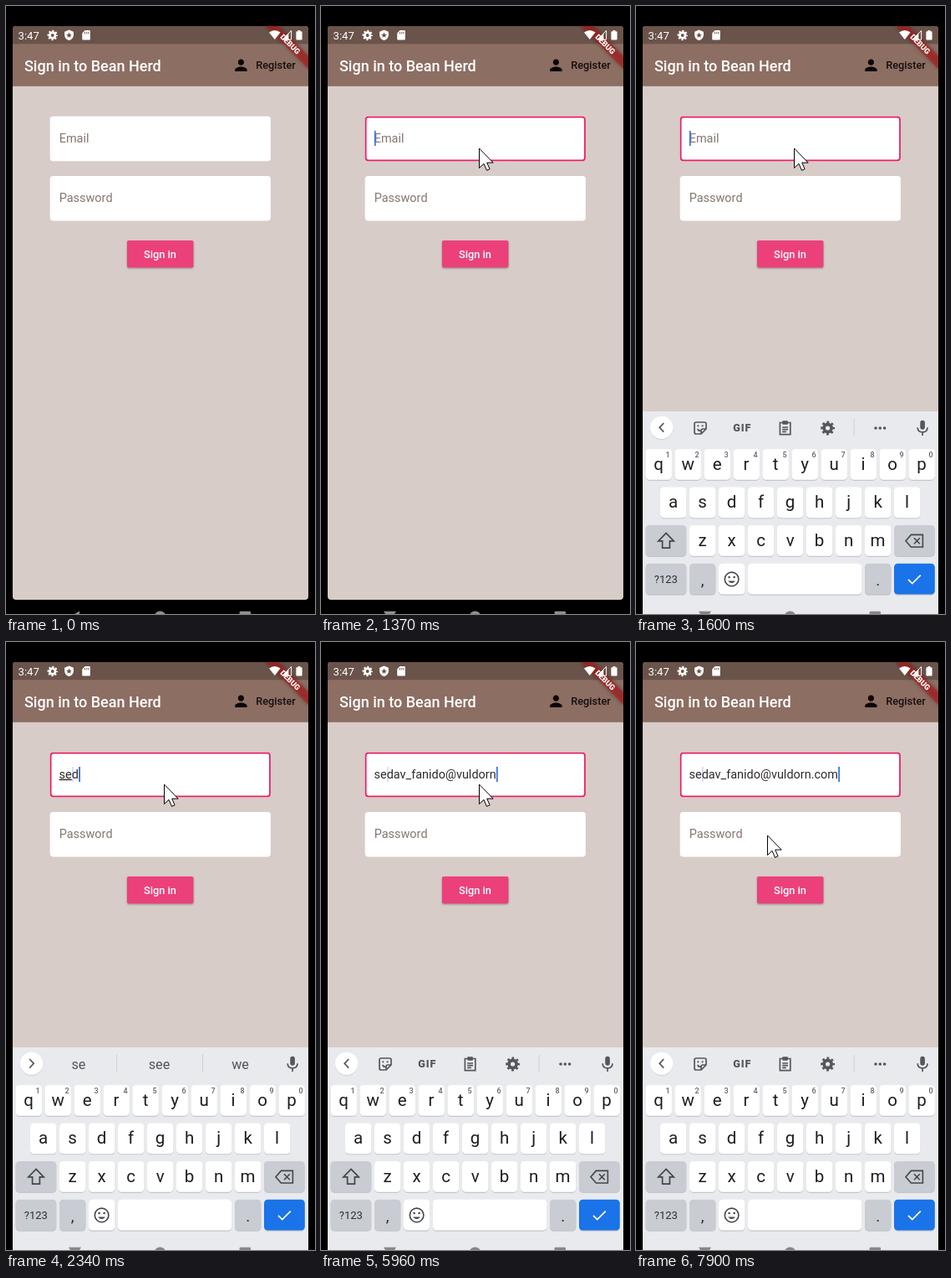
An HTML page for the animation above (8000 ms loop, 370 by 726 pixels).

```html
<!DOCTYPE html>
<html lang="en">
<head>
<meta charset="utf-8">
<title>Sign-in screen</title>
<style>
  html, body { margin: 0; width: 100%; height: 100%; overflow: hidden; background: #000; }
  svg { display: block; width: 370px; height: 726px; font-family: Roboto, "Noto Sans", sans-serif; }
  .mid { text-anchor: middle; }
  .med { font-weight: 500; }
  .line { fill: none; stroke: #54575b; stroke-width: 1.7; }
  .field { font-size: 14.46px; }
  .label { fill: #87756f; }
  .u { text-decoration: underline; }
</style>
</head>
<body>
<svg id="stage" viewBox="0 0 370 726" xmlns="http://www.w3.org/2000/svg"></svg>
<script>
const LOOP = 8000;
const stage = document.getElementById('stage');

// Markup helpers
const rect = (x, y, w, h, fill, r = 0, more = '') =>
  `<rect x="${x}" y="${y}" width="${w}" height="${h}" rx="${r}" fill="${fill}" ${more}/>`;
const circle = (x, y, r, more) => `<circle cx="${x}" cy="${y}" r="${r}" ${more}/>`;
const path = (d, more = '') => `<path d="${d}" ${more}/>`;
const text = (x, y, size, fill, str, cls = '', more = '') =>
  `<text x="${x}" y="${y}" font-size="${size}" fill="${fill}" class="${cls}" ${more}>${str}</text>`;

function gear(x, y, r, color) {
  const ring = r * 0.55, teeth = r * 0.86, gap = teeth * Math.PI / 8;
  return circle(x, y, ring, `fill="none" stroke="${color}" stroke-width="${r * 0.46}"`) +
    circle(x, y, teeth, `fill="none" stroke="${color}" stroke-width="${r * 0.34}"
      stroke-dasharray="${gap}" stroke-dashoffset="${gap / 2}"`);
}

function statusBar() {
  return text(14.6, 39.6, 13.1, '#fff', '3:47') +
    gear(55.7, 35, 6, '#fff') +
    path('M75.5 28.6l5.4 2.2v3.6c0 3.2-2.3 5.6-5.4 6.7c-3.1-1.1-5.4-3.5-5.4-6.7v-3.6z', 'fill="#fff"') +
    path('M75.5 31.5l1 2.2 2.3.2-1.8 1.5.6 2.3-2.1-1.3-2.1 1.3.6-2.3-1.8-1.5 2.3-.2z', 'fill="#6a534a"') +
    path('M94.6 29h5.2q1 0 1 1v9.5q0 1-1 1h-7.6q-1 0-1-1v-7z', 'fill="#fff"') +
    path('M94.5 31v2.4M96.7 31v2.4M98.8 31v2.4', 'stroke="#6a534a" stroke-width=".9"') +
    path('M315 31.4q6.8-5 13.6 0l-6.8 8.6z', 'fill="#fff"') +
    path('M341.6 29.4v10.8h-10.6z', 'fill="none" stroke="#fff" stroke-width="1"') +
    path('M338.4 32.6v7.6h-7.4z', 'fill="#fff"') +
    path('M349.6 29h2.8v1.3h1.3q.9 0 .9.9v8.3q0 .9-.9.9h-5.4q-.9 0-.9-.9v-8.3q0-.9.9-.9h1.3z', 'fill="#fff"');
}

function banner() {
  return `<g clip-path="url(#screen)"><g transform="translate(362 24) rotate(45) scale(.9)">
    ${rect(-40, 28, 80, 12, '#b71c1c', 0, 'fill-opacity=".63" style="filter:drop-shadow(0 0 3px rgba(0,0,0,.5))"')}
    ${text(0, 37.6, 10.2, '#fff', 'DEBUG', 'mid', 'font-weight="900"')}</g></g>`;
}

function page() {
  return rect(8, 24, 354, 685, '#d7ccc8', 4) +
    path('M8 46v-18q0-4 4-4h346q4 0 4 4v18z', 'fill="#6a534a"') +
    rect(8, 45.3, 354, 50.5, '#8d6e63') +
    text(22, 77.6, 18, '#fff', 'Sign in to Bean Herd', 'med') +
    path('M12 12c2.21 0 4-1.79 4-4s-1.79-4-4-4-4 1.79-4 4 1.79 4 4 4zm0 2c-2.67 0-8 1.34-8 4v2h16v-2c0-2.66-5.33-4-8-4z',
      'fill="#0b0706" transform="translate(270.6 60) scale(.9)"') +
    text(299.3, 75.3, 12.75, '#150f0d', 'Register', 'med') +
    rect(52.7, 131.8, 264.2, 53.4, '#fff', 3.6) +
    rect(53.6, 132.7, 262.4, 51.6, 'none', 3, 'id="focus" stroke="#e91e63" stroke-width="1.8"') +
    rect(52.7, 203, 264.2, 53.4, '#fff', 3.6) +
    text(63.7, 233.9, 14.46, '', 'Password', 'label') +
    rect(79, 149, 1.8, 18, '#d5dff8', 0, 'id="trace"') +
    text(63.7, 162.7, 14.46, '', 'Email', 'label', 'id="hint"') +
    `<text id="entry" class="field" x="63.6" y="162.7" fill="#2f2a29"><tspan id="composing" class="u"></tspan><tspan id="settled"></tspan></text>` +
    rect(0, 149, 1.9, 18, '#4479e0', 0, 'id="caret"') +
    rect(145, 280, 79.4, 32.2, '#ec407a', 1.8, 'style="filter:drop-shadow(0 1.3px 1.2px rgba(0,0,0,.35))"') +
    text(184.5, 300.7, 12.75, '#fff', 'Sign in', 'mid med');
}

function key(x, y, w, fill = '#fff') {
  return rect(x, y + 1.1, w, 36.8, '#c3c6cb', 4.5) + rect(x, y, w, 36.8, fill, 4.5);
}

function letterRow(chars, x, y, digits) {
  return [...chars].map((c, i) => {
    const left = x + i * 35;
    return key(left, y, 31.4) + text(left + 15.6, y + 24.6, 20.5, '#1d1e20', c, 'mid') +
      (digits ? text(left + 26.6, y + 10, 9, '#5f6368', (i + 1) % 10, 'mid med') : '');
  }).join('');
}

function tools() {
  return path('M33.2 498l-5 5.3 5 5.3', 'class="line"') +
    path('M72 497h10q2 0 2 2v6l-6 6h-6q-2 0-2-2v-10q0-2 2-2zM84 505h-4q-2 0-2 2v4M73.5 505q1.5 2.6 4 2.2', 'class="line"') +
    circle(74.3, 501.3, 1.1, 'fill="#54575b"') + circle(79.6, 501.3, 1.1, 'fill="#54575b"') +
    text(127.3, 508.3, 12.6, '#54575b', 'GIF', 'mid', 'font-weight="900" letter-spacing=".9"') +
    path('M172.4 497.5h12.4v14.2h-12.4zM175.2 503h6.8M175.2 505.6h6.8M175.2 508.3h4.6', 'class="line"') +
    rect(175.2, 495.3, 6.8, 4.4, '#54575b', 1.2) +
    gear(229.6, 504, 8.2, '#54575b') +
    rect(260.6, 493, 1, 21, '#cfd2d6') +
    [287, 292.3, 297.6].map(x => circle(x, 504, 1.8, 'fill="#54575b"')).join('');
}

function suggestions() {
  return path('M28.2 498l5 5.3-5 5.3', 'class="line"') +
    [132, 235].map(x => rect(x, 492, 1, 22, '#cfd2d6')).join('') +
    [87, 183.5, 280.5].map(x => text(x, 510, 16.2, '#505357', '', 'mid word')).join('');
}

function keyboard() {
  const gray = '#c9ccd2', dark = '#43464a';
  return rect(8, 484, 354, 242, '#e8eaed') +
    circle(30.6, 504.4, 13.6, 'fill="#cdd0d4"') + circle(30.6, 503.4, 13.6, 'fill="#fff"') +
    `<g id="tools">${tools()}</g><g id="words">${suggestions()}</g>` +
    rect(340.3, 494.8, 5.6, 11, '#54575b', 2.8) +
    path('M337.2 503.2q0 5.6 5.9 5.6t5.9-5.6M343.1 509v4', 'class="line"') +
    letterRow('qwertyuiop', 11.5, 529, true) +
    letterRow('asdfghjkl', 29, 574.4) +
    key(11.5, 620, 48.8, gray) + letterRow('zxcvbnm', 64, 620) + key(309, 620, 48.8, gray) +
    path('M36 629.4l9.2 9.4h-4.8v8.4h-8.8v-8.4h-4.8z', `fill="none" stroke="${dark}" stroke-width="1.7"`) +
    path('M329.4 631.4h14v14.6h-14l-6.4-7.3zM333 635.2l6.8 7M339.8 635.2l-6.8 7', `fill="none" stroke="${dark}" stroke-width="1.6"`) +
    key(11.5, 665.8, 48.8, gray) + text(35.9, 689.4, 13, '#2b2d30', '?123', 'mid') +
    key(64, 665.8, 31.4, gray) + text(79.7, 692, 19, '#2b2d30', ',', 'mid') +
    key(99, 665.8, 31.4) + circle(114.6, 684.4, 8.3, `fill="none" stroke="${dark}" stroke-width="1.6"`) +
    circle(111.6, 682, 1.3, `fill="${dark}"`) + circle(117.6, 682, 1.3, `fill="${dark}"`) +
    path('M110.2 686.4q4.4 5 8.8 0z', `fill="${dark}"`) +
    key(134, 665.8, 136.4) +
    key(274, 665.8, 31.4, gray) + text(289.7, 692, 19, '#2b2d30', '.', 'mid') +
    key(309, 665.8, 48.8, '#1a73e8') +
    path('M326 684.8l4.8 4.8 10-10', 'fill="none" stroke="#fff" stroke-width="1.8"');
}

stage.innerHTML =
  `<defs><clipPath id="screen">${rect(8, 24, 354, 702, '#000', 4)}</clipPath></defs>` +
  rect(0, 0, 370, 726, '#000') + page() + banner() + statusBar() +
  `<g clip-path="url(#screen)"><g id="keyboard">${keyboard()}</g></g>` +
  rect(8, 709, 354, 17, '#000', 0, 'id="navBar"') +
  `<g id="nav">${path('M88 722.6v9l-10-1.6z', 'id="back"')}${circle(184.5, 729, 6.6)}${rect(279.6, 722.8, 13.4, 13, '', 1.2)}</g>` +
  path('M.5 0v23.5l5.5-5.2 3.5 8 3.6-1.6-3.4-7.6h7.5z',
    'id="mouse" fill="#fff" stroke="#000" stroke-width="1" stroke-linejoin="round"');

const el = {};
stage.querySelectorAll('[id]').forEach(n => el[n.id] = n);
const words = [...stage.querySelectorAll('.word')];

// Timeline: each entry holds until the next
const ADDRESS = 'sedav_fanido@vuldorn.com';
const keyTimes = [1930, 2130, 2340, 2570, 2750, 3410, 3640, 3740, 3950, 4050, 4200, 4330,
  4710, 5040, 5120, 5270, 5400, 5630, 5830, 5960, 6550, 6700, 6780, 6930];
const composed = [[0, 0], [1930, 1], [2230, 2], [2440, 3], [2570, 4], [2750, 5], [3640, 0]];
const offers = [[0, ''], [2030, 's so is'], [2230, 'se see we'], [2440, 'sed see set'],
  [2570, 'seda sedan set'], [2820, 'sedav sedan set']];
const caretOff = [[0, 1040], [3230, 3410], [6420, 6550], [7390, 7850]];
const mousePath = [
  [70, 299, 697], [120, 284, 540], [170, 250, 320], [220, 222, 185],
  [550, 217, 181], [600, 205, 171], [650, 188, 160], [700, 175, 153], [750, 171, 152],
  [810, 182, 163], [860, 189, 170],
  [7440, 187, 175], [7490, 181, 188], [7540, 173, 204], [7580, 165, 218], [7620, 159, 228], [7670, 157, 231]
];

const held = (list, t) => list.filter(e => e[0] <= t).pop();
const clamp = v => Math.max(0, Math.min(1, v));
const show = (node, on) => node.style.display = on ? '' : 'none';

function draw(t) {
  const typed = ADDRESS.slice(0, keyTimes.filter(k => k <= t).length);
  const mark = held(composed, t)[1];
  el.composing.textContent = typed.slice(0, mark);
  el.settled.textContent = typed.slice(mark);
  show(el.hint, !typed);
  show(el.trace, typed.length > 2);
  el.focus.style.opacity = clamp((t - 1040) / 200);

  show(el.caret, !caretOff.some(([a, b]) => t >= a && t < b));
  el.caret.setAttribute('x', 63.8 + (typed ? el.entry.getComputedTextLength() : 0));

  const rise = 1 - (1 - clamp((t - 1490) / 110)) ** 2;
  show(el.keyboard, rise > 0);
  el.keyboard.setAttribute('transform', `translate(0 ${242 * (1 - rise)})`);
  const offering = t >= 2030 && t < 3640;
  show(el.tools, !offering);
  show(el.words, offering);
  const list = held(offers, t)[1].split(' ');
  words.forEach((w, i) => w.textContent = list[i] || '');

  el.navBar.setAttribute('fill', rise > 0 ? '#e8eaed' : '#000');
  el.nav.setAttribute('fill', rise > 0 ? '#858789' : '#8f8f8f');
  el.back.setAttribute('d', t < 1250 ? 'M88 722.6v14l-12-7z' : 'M75 722.8h15l-7.5 12z');

  const at = held(mousePath, t);
  show(el.mouse, at);
  if (at) el.mouse.setAttribute('transform', `translate(${at[1]} ${at[2]})`);
}

const start = performance.now();
function tick() {
  draw((performance.now() - start) % LOOP);
  requestAnimationFrame(tick);
}
tick();
</script>
</body>
</html>
```
